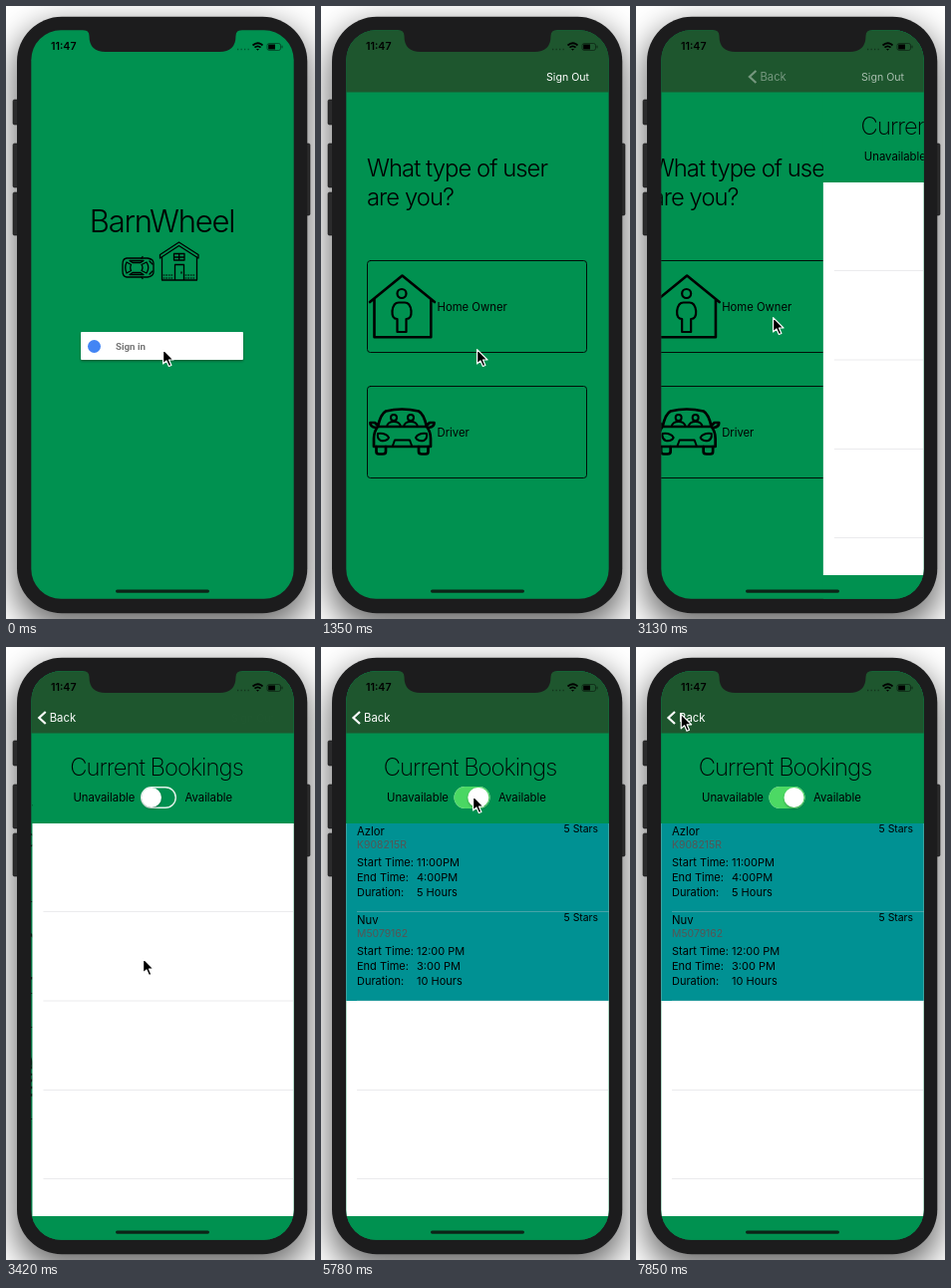
Animation of 310x615 px, one loop 7990 ms. Source, as an HTML page:

```html
<!DOCTYPE html>
<html lang="en">
<head>
<meta charset="utf-8">
<title>Phone demo</title>
<style>
  html, body { margin: 0; width: 100%; height: 100%; overflow: hidden; background: #fff; }
  svg { display: block; width: 310px; height: 615px; }
  text { font: 400 11.3px Inter, sans-serif; white-space: pre; }
  .title { font-size: 23.8px; font-weight: 300; letter-spacing: -.04em; }
  .small { font-size: 10.4px; }
  .detail text { font-size: 11px; }
  .line { fill: none; stroke: #000; stroke-linejoin: round; stroke-linecap: round; }
</style>
</head>
<body>
<svg viewBox="0 0 310 615">
  <defs>
    <filter id="blur" x="-30%" y="-30%" width="160%" height="160%"><feGaussianBlur stdDeviation="16"/></filter>
    <filter id="soft"><feGaussianBlur stdDeviation="1"/></filter>
    <clipPath id="screen"><rect x="25.300" y="24.300" width="263.400" height="570.400" rx="30"/></clipPath>
  </defs>

  <rect x="8" y="20" width="297" height="606" rx="48" opacity=".57" filter="url(#blur)"/>
  <g fill="#2b2b2c" stroke="#111" stroke-width=".6">
    <rect x="7" y="94" width="7" height="25" rx="1.5"/>
    <rect x="7" y="138" width="7" height="44" rx="1.5"/>
    <rect x="7" y="187" width="7" height="43" rx="1.5"/>
    <rect x="299" y="138" width="6" height="72" rx="1.5"/>
  </g>
  <rect x="11" y="10.700" width="291.300" height="598.500" rx="45" fill="#1c1c1d"/>

  <g clip-path="url(#screen)">
    <rect x="25" y="24" width="264" height="571" fill="#009150"/>

    <g id="login">
      <text class="title" x="156.500" y="227" text-anchor="middle" style="font-size:31px">BarnWheel</text>
      <g class="line" stroke-width="1.300">
        <path d="M121 253H142Q148 254 148 258V267Q148 271 142 272H121Q117 271.500 117 266V259Q117 253.500 121 253Z"/>
        <path d="M121 257Q118.500 262.500 121 268L125.500 265.500Q124 262.500 125.500 259.500ZM141 257Q144.500 262.500 141 268L136 265.500Q138 262.500 136 259.500ZM124 255.500H138L135 257.500H127ZM124 269.500H138L135 267.500H127ZM136 253L137 251.500M136 272L137 273.500M144 256L147 259M144 269L147 266"/>
        <path d="M154.500 249.500L173.500 237L193 249.500V253L173.500 240.500L154.500 253ZM156.500 252V275H191.500V252M168.500 248.500H179V255H168.500ZM173.700 248.500V255M168.500 252H179M169.500 275V259.500H178.500V275M176 267V268"/>
        <path d="M158 270H168M180 270H190M158 273H168M180 273H190" stroke-dasharray="1 1.600" stroke-width="1"/>
      </g>
      <rect x="75" y="328.500" width="163" height="28" rx="1" opacity=".35" filter="url(#soft)"/>
      <rect id="button" x="75" y="327" width="163" height="28" rx="1" fill="#fff"/>
      <circle cx="88.500" cy="341.500" r="6.500" fill="#4285f4"/>
      <text x="110" y="345" fill="#757575" style="font:700 9.7px Roboto,sans-serif">Sign in</text>
    </g>

    <g id="chooser">
      <text class="title" x="46" y="171">What type of user</text>
      <text class="title" x="46" y="200">are you?</text>
      <g class="line" stroke-width=".9">
        <rect x="46.500" y="255.500" width="220" height="92" rx="3"/>
        <rect x="46.500" y="381.500" width="220" height="92" rx="3"/>
      </g>
      <g class="line" stroke-width="2.600">
        <path d="M49 297L81.500 270.500L114 297M53.500 294V332.300H110.300V294"/>
        <circle cx="81" cy="288.500" r="4.500" stroke-width="2.200"/>
        <path d="M76.500 327V314Q71 314 71.500 306Q72.500 297.500 78 297.500H84Q89.500 297.500 90.500 306Q91 314 85.500 314V327Z" stroke-width="2.200"/>
      </g>
      <g class="line" stroke-width="2.700">
        <path d="M57 422Q60 409 65 406.500Q81 402.500 98 406.500Q103 409 106 422ZM57 422Q53 427 53 434V442H110V434Q110 427 106 422M57 421L54 418H49.500Q49 422 55 423M106 421L109 418H113.500Q114 422 108 423"/>
        <path d="M55.500 442V447Q55.500 449.500 58 449.500H62Q65 449.500 65 447V442M98 442V447Q98 449.500 101 449.500H105Q107.500 449.500 107.500 447V442"/>
        <path d="M72 441L74 435.500H89L91 441" stroke-width="2"/>
        <g stroke-width="2">
          <path d="M57 429Q65 428 68 433Q66 437 60 436Q56 434 57 429ZM106 429Q98 428 95 433Q97 437 103 436Q107 434 106 429Z"/>
          <circle cx="73" cy="413" r="3"/><circle cx="90" cy="413" r="3"/>
          <path d="M66 422Q67 417 73 417T80 422M83 422Q84 417 90 417T97 422"/>
        </g>
      </g>
      <text x="116.500" y="306">Home Owner</text>
      <text x="116.500" y="432">Driver</text>
    </g>

    <g id="bookings">
      <rect x="25" y="24" width="264" height="571" fill="#009150"/>
      <text class="title" x="149.500" y="129" text-anchor="middle" style="font-weight:200">Current Bookings</text>
      <text x="66" y="155">Unavailable</text>
      <text x="178" y="155">Available</text>
      <rect x="134.200" y="140.700" width="34.600" height="20.600" rx="10.300" fill="none" stroke="#e4f2ea" stroke-width="1.400"/>
      <rect id="switchFill" x="133.500" y="140" width="36" height="22" rx="11" fill="#4cd964"/>
      <rect id="knobShadow" y="142.500" height="20" rx="10" opacity=".22" filter="url(#soft)"/>
      <rect id="knob" y="141" height="20" rx="10" fill="#fff"/>
      <rect x="25" y="177" width="264" height="394" fill="#fff"/>
      <g id="rows"></g>
      <path d="M36 265.500H289M36 355H289M36 444.500H289M36 533.500H289" stroke="#c8c7cc" stroke-opacity=".45" stroke-width=".8"/>
    </g>

    <g id="nav">
      <rect x="25" y="24" width="264" height="62.500" fill="#1e562e"/>
      <text id="signOut" x="269" y="75" text-anchor="end" fill="#fff" style="font-size:10.6px">Sign Out</text>
      <g id="back">
        <path d="M39 65L32.500 71L39 77" fill="none" stroke="#fff" stroke-width="2.200"/>
        <text x="43" y="75" fill="#fff">Back</text>
      </g>
    </g>

    <text x="45" y="44" style="font-size:10.6px;font-weight:600">11:47</text>
    <path d="M232 43.500H244" stroke="#000" stroke-opacity=".4" stroke-width="1.300" stroke-dasharray="1.300 2.200"/>
    <g fill="none" stroke="#000" stroke-width="1.700">
      <path d="M247.500 39.500Q252.500 35 257.500 39.500M249.500 41.700Q252.500 39 255.500 41.700"/>
      <path d="M251 43L252.500 44.800L254 43Z" fill="#000" stroke="none"/>
      <rect x="262" y="37.500" width="13.500" height="7" rx="2" stroke-width=".8" stroke-opacity=".55"/>
      <path d="M263.200 41H270" stroke-width="4.800"/>
      <path d="M277 39.700V42.300" stroke-width="1" stroke-opacity=".55"/>
    </g>
    <rect x="110" y="585.500" width="94" height="3.200" rx="1.600" fill="#0c2418"/>
  </g>

  <path d="M77 23V24Q83.500 24 83.500 30Q83.500 46 100 46H214Q230.500 46 230.500 30Q230.500 24 237 24V23Z" fill="#1c1c1d"/>
  <path id="cursor" d="M.6 .6V15L4 12L6.400 17.500L8.900 16.500L6.500 11H11Z" stroke="#fff" stroke-width="1.200" stroke-linejoin="round"/>
</svg>

<script>
const LOOP = 7990, WIDTH = 264;
const CHOOSER_AT = 1350, PUSH_AT = 3130, ROWS_AT = 3715;
const $ = id => document.getElementById(id);
const set = (id, attrs) => {
  for (const name in attrs) $(id).setAttribute(name, attrs[name]);
};
const show = (id, on) => set(id, { visibility: on ? 'visible' : 'hidden' });

// Each key is [time, ...values].
const cursorKeys = [
  [0, 157, 344], [150, 157, 344], [300, 156, 344], [2100, 156, 344],
  [2400, 146, 399], [2540, 140, 372], [2690, 137, 330], [2840, 137, 312],
  [3570, 137, 312], [3720, 138, 285], [4010, 148, 180], [4160, 151, 155],
  [4310, 152, 148], [4450, 152, 148], [4600, 152, 149], [6960, 152, 149],
  [7110, 135, 128], [7260, 88, 90], [7410, 42, 62], [7550, 23, 54],
  [7700, 36, 62], [7850, 45, 67]
];
// Switch position and extra knob width while pressed.
const switchKeys = [
  [4310, 0, 0], [4450, 0, 3], [4600, .6, 3], [4750, 1, 2], [4900, 1, 0],
  [5640, 1, 0], [5780, 1, 1], [5930, .2, 2], [6070, 0, 1], [6220, .8, 2], [6370, 1, 0]
];

function track(keys, t) {
  const next = keys.findIndex(key => key[0] > t);
  if (next < 0) return keys[keys.length - 1].slice(1);
  if (next === 0) return keys[0].slice(1);
  const a = keys[next - 1], b = keys[next], k = (t - a[0]) / (b[0] - a[0]);
  return a.slice(1).map((v, i) => v + (b[i + 1] - v) * k);
}

const snap = t => t < 2250
  ? Math.floor(t / 150) * 150
  : 2250 + Math.floor((t - 2242) / 147.2) * 147.2;

function bookingRow([name, plate, start, end, duration], i) {
  const details = [['Start Time:', start], ['End Time:', end], ['Duration:', duration]];
  return `<g transform="translate(0 ${i * 89})">
    <rect x="25" y="177" width="264" height="89" fill="#009193"/>
    <text x="36" y="189">${name}</text>
    <text class="small" x="36" y="202" fill="#555">${plate}</text>
    <text class="small" x="278" y="186" text-anchor="end">5 Stars</text>
    <g class="detail">${details.map(([label, value], n) =>
      `<text x="36" y="${220 + n * 15.2}">${label}</text><text x="96" y="${220 + n * 15.2}">${value}</text>`).join('')}
    </g></g>`;
}
$('rows').innerHTML = [
  ['Azlor', 'K908215R', '11:00PM', '4:00PM', '5 Hours'],
  ['Nuv', 'M5079162', '12:00 PM', '3:00 PM', '10 Hours']
].map(bookingRow).join('');

function draw(time) {
  const t = snap(time);
  const offset = t < PUSH_AT ? WIDTH : WIDTH * Math.exp(-.016 * (t - 3103));
  const pushed = 1 - offset / WIDTH;

  show('login', t < CHOOSER_AT);
  show('chooser', t >= CHOOSER_AT && t < ROWS_AT);
  show('nav', t >= CHOOSER_AT);
  show('bookings', t >= PUSH_AT);
  show('rows', t >= ROWS_AT);

  set('button', { fill: t >= 150 && t < 300 ? '#e8e8e8' : '#fff' });
  set('chooser', { transform: `translate(${-.3 * WIDTH * pushed} 0)` });
  set('bookings', { transform: `translate(${offset} 0)` });
  set('signOut', { opacity: 1 - pushed });
  set('back', { opacity: pushed, transform: `translate(${offset / 2} 0)` });

  const [on, press] = track(switchKeys, t);
  const knob = { x: 134.5 + on * (14 - press), width: 20 + press };
  set('switchFill', { opacity: on });
  set('knob', knob);
  set('knobShadow', knob);

  set('cursor', { transform: `translate(${track(cursorKeys, t)})` });
}

const began = performance.now();
function tick() {
  draw((performance.now() - began) % LOOP);
  requestAnimationFrame(tick);
}
tick();
</script>
</body>
</html>
```
